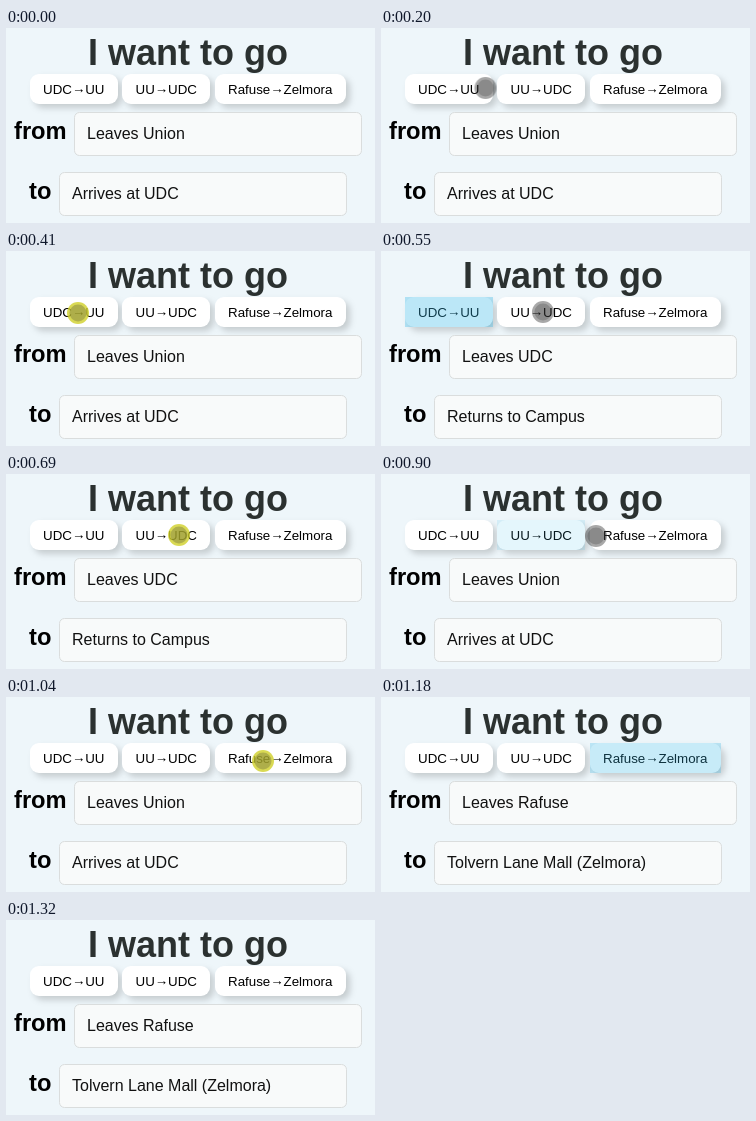
Write an HTML page that moves like this. It is 369 px wide and 195 px high and loops after 1660 ms.

```html
<!DOCTYPE html>
<html lang="en">
<head>
<meta charset="utf-8">
<title>I want to go</title>
<style>
  html, body { margin: 0; width: 100%; height: 100%; overflow: hidden; background: #eef6fa; }
  svg { display: block; width: 369px; height: 195px; font-family: "Liberation Sans", Arial, sans-serif; }

  .title { font: bold 36px "Liberation Sans", Arial, sans-serif; fill: #2b3130; text-anchor: middle; }
  .label { font-size: 23.7px; font-weight: bold; }
  .field rect { fill: #f8fafa; stroke: #dadddd; }
  .field text { font-size: 16px; fill: #111; }
  .button rect { fill: #fff; filter: drop-shadow(4px 4px 3px rgba(0, 0, 0, .17)); }
  .button text { font-size: 13.333px; }

  .tap, .trip, .pointer, .halo { animation: 1660ms step-end infinite; }
  .tap { fill: #33b5e5; opacity: 0; }
  .tap.a { animation-name: tap-a; }
  .tap.b { animation-name: tap-b; }
  .tap.c { animation-name: tap-c; }
  @keyframes tap-a {
    0% { opacity: 0; } 28.91% { opacity: .4; } 33.13% { opacity: .33; }
    37.34% { opacity: .15; } 41.56%, 100% { opacity: 0; }
  }
  @keyframes tap-b {
    0% { opacity: 0; } 45.78% { opacity: .4; } 50% { opacity: .27; }
    54.21% { opacity: .13; } 58.43%, 100% { opacity: 0; }
  }
  @keyframes tap-c {
    0% { opacity: 0; } 66.86% { opacity: .4; } 71.08% { opacity: .27; }
    75.3% { opacity: .13; } 79.51%, 100% { opacity: 0; }
  }

  .trip { visibility: hidden; }
  .union { animation-name: union; }
  .udc { animation-name: udc; }
  .rafuse { animation-name: rafuse; }
  @keyframes union {
    0%, 45.78% { visibility: visible; }
    28.91%, 66.86%, 100% { visibility: hidden; }
  }
  @keyframes udc {
    0%, 45.78%, 100% { visibility: hidden; }
    28.91% { visibility: visible; }
  }
  @keyframes rafuse {
    0% { visibility: hidden; }
    66.86%, 100% { visibility: visible; }
  }

  .pointer { animation-name: move; }
  @keyframes move {
    0% { transform: translate(-30px, 60px); }
    4.21% { transform: translate(193px, 60px); }
    8.43% { transform: translate(147px, 60px); }
    12.04% { transform: translate(104.5px, 60px); }
    16.26% { transform: translate(80px, 61px); }
    20.48% { transform: translate(70px, 61px); }
    24.69% { transform: translate(72px, 62px); }
    28.91% { transform: translate(115px, 61px); }
    33.13% { transform: translate(162px, 61px); }
    37.34% { transform: translate(169px, 61px); }
    41.56% { transform: translate(173px, 61px); }
    45.78% { transform: translate(175px, 61px); }
    50% { transform: translate(190px, 61px); }
    54.21% { transform: translate(215px, 62px); }
    58.43% { transform: translate(241px, 63px); }
    62.65% { transform: translate(257px, 64px); }
    66.86% { transform: translate(267px, 73px); }
    71.08%, 100% { transform: translate(-30px, 73px); }
  }
  .halo { fill: #303030; fill-opacity: .42; animation-name: press; }
  .core { fill: #303030; fill-opacity: .25; }
  @keyframes press {
    0%, 28.91%, 45.78%, 66.86%, 100% { fill: #303030; fill-opacity: .42; }
    24.69%, 41.56%, 62.65% { fill: #cfcf28; fill-opacity: .8; }
  }
</style>
</head>
<body>
<svg viewBox="0 0 369 195">
  <text class="title" x="182" y="37">I want to go</text>

  <g class="button">
    <rect x="24" y="46" width="88" height="30" rx="9"/>
    <rect x="116" y="46" width="88" height="30" rx="9"/>
    <rect x="209" y="46" width="131" height="30" rx="9"/>
    <text x="37" y="66">UDC<tspan dy="-1.5">→</tspan><tspan dy="1.5">UU</tspan></text>
    <text x="129.5" y="66">UU<tspan dy="-1.5">→</tspan><tspan dy="1.5">UDC</tspan></text>
    <text x="222" y="66">Rafuse<tspan dy="-1.5">→</tspan><tspan dy="1.5">Zelmora</tspan></text>
  </g>

  <text class="label" x="8" y="111">from</text>
  <text class="label" x="23" y="171">to</text>
  <g class="field">
    <rect x="68.5" y="84.5" width="287" height="43" rx="5"/>
    <rect x="53.5" y="144.5" width="287" height="43" rx="5"/>
    <g class="trip union">
      <text x="81" y="111">Leaves Union</text>
      <text x="66" y="171">Arrives at UDC</text>
    </g>
    <g class="trip udc">
      <text x="81" y="111">Leaves UDC</text>
      <text x="66" y="171">Returns to Campus</text>
    </g>
    <g class="trip rafuse">
      <text x="81" y="111">Leaves Rafuse</text>
      <text x="66" y="171">Tolvern Lane Mall (Zelmora)</text>
    </g>
  </g>

  <rect class="tap a" x="24" y="46" width="88" height="30"/>
  <rect class="tap b" x="116" y="46" width="88" height="30"/>
  <rect class="tap c" x="209" y="46" width="131" height="30"/>

  <g class="pointer">
    <circle class="halo" r="11"/>
    <circle class="core" r="8.5"/>
  </g>
</svg>
</body>
</html>
```
